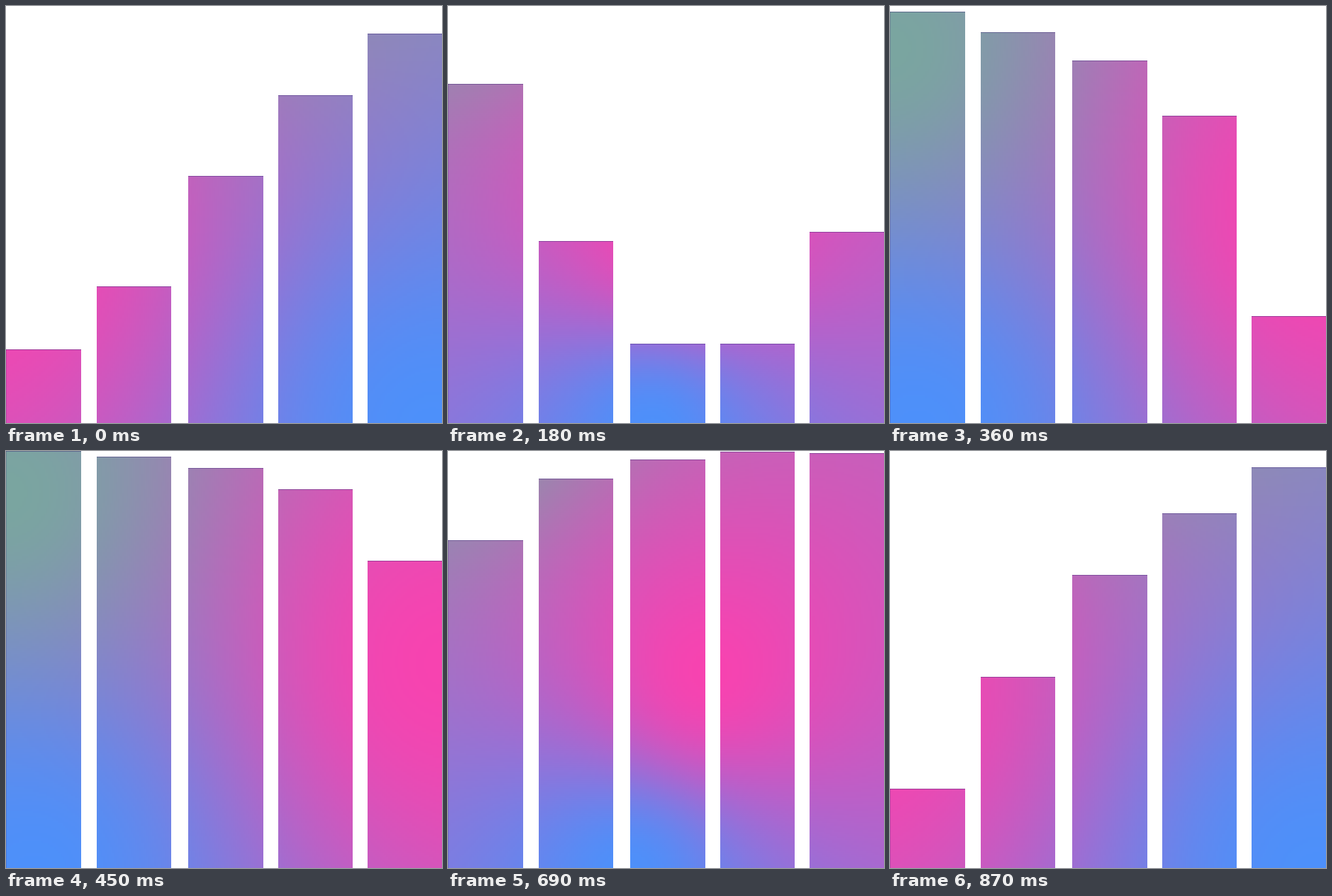
Animation of 615 by 589 pixels, one loop 0.9 s. Source, as an HTML page with a canvas:

```html
<!DOCTYPE html>
<html lang="en">
<head>
<meta charset="utf-8">
<title>Equalizer bars</title>
<style>
  html, body { margin: 0; width: 100%; height: 100%; overflow: hidden; background: #fff; }
  canvas { display: block; }
</style>
</head>
<body>
<canvas id="stage" width="615" height="589"></canvas>
<script>
const WIDTH = 615, HEIGHT = 589;
const STEP_MS = 30, STEPS = 30;
const CELL = 3; // the gradient is computed on a coarse grid and scaled up smoothly

// Top edge over one bounce: quick rise, short rest, softer fall.
const BOUNCE = [
  485, 477, 438, 332, 223, 155, 110, 77, 54, 37, 24, 15, 8, 3, 0,
  0, 1, 5, 12, 23, 39, 61, 88, 126, 175, 240, 319, 396, 450, 477
];

const BARS = [
  { x: 0, w: 106, delay: 0 },
  { x: 128, w: 105, delay: 3 },
  { x: 257, w: 106, delay: 5 },
  { x: 384, w: 105, delay: 7 },
  { x: 510, w: 105, delay: 10 }
];

const PINK = [247, 67, 176], BLUE = [77, 144, 250], TEAL = [122, 165, 160];

const ctx = document.getElementById("stage").getContext("2d");
const field = document.createElement("canvas");
field.width = Math.ceil(WIDTH / CELL);
field.height = Math.ceil(HEIGHT / CELL);
const fieldCtx = field.getContext("2d");
const pixels = fieldCtx.createImageData(field.width, field.height);

const mix = (a, b, k) => a + (b - a) * k;
const curve = (a, c, b, k) => mix(mix(a, c, k), mix(c, b, k), k);

function smoothstep(from, to, value) {
  const k = Math.min(1, Math.max(0, (value - from) / (to - from)));
  return k * k * (3 - 2 * k);
}

// 0: pink on the right, 1: pink on the left
const sweep = step => 1 - smoothstep(2.5, 9, step) + smoothstep(18.8, 28.8, step);

function colorSpots(k) {
  return [
    { color: PINK, weight: 2, x: mix(620, -40, k), y: mix(300, 332, k) },
    { color: BLUE, weight: 1.6, x: mix(40, 600, k), y: 600 },
    { color: TEAL, weight: 1, x: curve(0, -98, 320, k), y: curve(60, -179, -200, k) }
  ];
}

// Blend the spots by inverse squared distance.
function paintField(spots) {
  const data = pixels.data;
  let i = 0;
  for (let row = 0; row < field.height; row++) {
    const y = (row + 0.5) * CELL;
    for (let col = 0; col < field.width; col++) {
      const x = (col + 0.5) * CELL;
      let r = 0, g = 0, b = 0, total = 0;
      for (const spot of spots) {
        const dx = x - spot.x, dy = y - spot.y;
        const w = spot.weight / (dx * dx + dy * dy + 1);
        r += spot.color[0] * w;
        g += spot.color[1] * w;
        b += spot.color[2] * w;
        total += w;
      }
      data[i++] = r / total;
      data[i++] = g / total;
      data[i++] = b / total;
      data[i++] = 255;
    }
  }
  fieldCtx.putImageData(pixels, 0, 0);
}

function draw(step) {
  const tops = BARS.map(bar => BOUNCE[(step - bar.delay + STEPS) % STEPS]);
  paintField(colorSpots(sweep(step)));

  ctx.fillStyle = "#fff";
  ctx.fillRect(0, 0, WIDTH, HEIGHT);

  ctx.save();
  ctx.beginPath();
  BARS.forEach((bar, i) => ctx.rect(bar.x, tops[i], bar.w, HEIGHT - tops[i]));
  ctx.clip();
  ctx.imageSmoothingEnabled = true;
  ctx.drawImage(field, 0, 0, field.width * CELL, field.height * CELL);
  ctx.restore();

  // Thin darker edges
  ctx.fillStyle = "rgba(50, 30, 110, 0.4)";
  BARS.forEach((bar, i) => ctx.fillRect(bar.x, tops[i], bar.w, 1));
  ctx.fillStyle = "rgba(50, 30, 110, 0.2)";
  ctx.fillRect(0, tops[0], 1, HEIGHT - tops[0]);
}

let shown = -1;
const start = performance.now();

function tick() {
  const elapsed = performance.now() - start;
  const step = Math.floor(elapsed / STEP_MS) % STEPS;
  if (step !== shown) {
    draw(step);
    shown = step;
  }
  requestAnimationFrame(tick);
}
tick();
</script>
</body>
</html>
```
